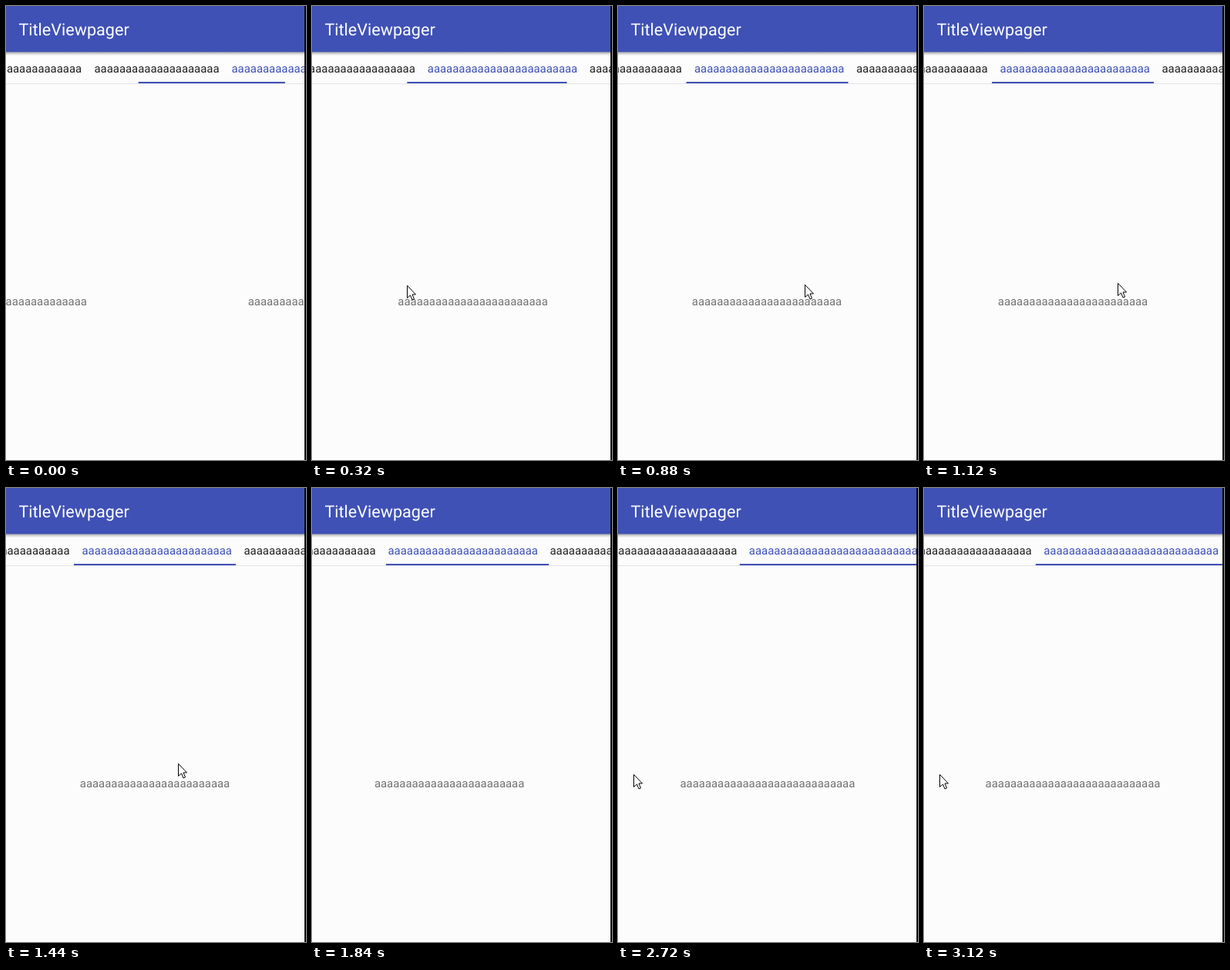
Animation of 389 by 587 pixels, one loop 3280 ms. Source, as an HTML page with a canvas:

```html
<!DOCTYPE html>
<html lang="en">
<head>
<meta charset="utf-8">
<title>TitleViewpager</title>
<style>
  html, body { margin: 0; width: 100%; height: 100%; overflow: hidden; }
  canvas { display: block; }
</style>
</head>
<body>
<canvas id="stage" width="389" height="587"></canvas>
<script>
const ctx = document.getElementById('stage').getContext('2d');
const LOOP = 3280, STEP = 80, PAGE = 387;
const PRESS = 1520, SELECT = 2080, RETURN = 2640;
const BLUE = '#3f51b5', FONT_SIZE = 14.9;

const stalls = [1040, 1200, 2000, 2240, 2400, 2480, 3040, 3200];
const ticks = Array.from({ length: LOOP / STEP }, (_, i) => i * STEP)
  .filter(t => !stalls.includes(t));

// Each tab is four letters longer than the one before; x counts from tab 1.
const tabs = [];
for (let i = 0, x = -146; i < 4; i++) {
  const n = 16 + 4 * i, w = 8 * n + 18;
  tabs.push({ label: 'a'.repeat(n), x, w });
  x += w;
}

const lerp = (a, b, u) => a + (b - a) * u;
const easeOut = (u, power) => 1 - (1 - Math.min(Math.max(u, 0), 1)) ** power;

// Pager position in pages: a settling page, then a short drag and a fling.
function position(t) {
  if (t < 0) return 1.38;
  if (t < PRESS) return lerp(1.437, 2, easeOut(t / 780, 5));
  const drag = 2 + .0385 * easeOut((t - PRESS) / 320, 3);
  return lerp(drag, 3, easeOut((t - 2000) / 1028, 5));
}

// Left edge of the text of tab 1; the strip scrolls after each selection.
function stripLeft(t) {
  const scroll = start => easeOut((t - start) / 1131, 4);
  return 115 - 194 * scroll(0) - 153.5 * scroll(2220);
}

function rect(x, y, w, h, color) {
  ctx.fillStyle = color;
  ctx.fillRect(x, y, w, h);
}

function text(str, x, y, size, color) {
  ctx.font = size + 'px Roboto, sans-serif';
  ctx.fillStyle = color;
  ctx.fillText(str, x, y);
}

const arrow = new Path2D('M.5 .5v16l4-3.5 2.5 6 2.5-1-2.5-6h4.5z');

function drawCursor(x, y) {
  ctx.save();
  ctx.translate(Math.round(x), Math.round(y));
  ctx.fillStyle = '#fff';
  ctx.fill(arrow);
  ctx.strokeStyle = '#000';
  ctx.stroke(arrow);
  ctx.restore();
}

function drawHeader() {
  const shadow = ctx.createLinearGradient(0, 59, 0, 64);
  shadow.addColorStop(0, 'rgba(0,0,0,.35)');
  shadow.addColorStop(1, 'rgba(0,0,0,0)');
  rect(0, 59, PAGE, 5, shadow);
  rect(0, 0, PAGE, 59.5, BLUE);
  text('TitleViewpager', 16.4, 38, 21.6, '#fff');
}

function draw(t, before) {
  rect(0, 0, 389, 587, '#fcfcfc');
  drawHeader();

  const left = stripLeft(t), pos = position(t);
  const selected = t < SELECT ? 2 : 3;
  tabs.forEach(({ label, x }, i) => {
    text(label, left + x - .5, 86, FONT_SIZE, i === selected ? BLUE : '#212121');
    const width = ctx.measureText(label).width;
    text(label, (i - pos) * PAGE + 193 - width / 2, 387, FONT_SIZE, '#737373');
  });

  // The indicator trails the pages by one picture.
  const trail = position(before), i = Math.min(Math.floor(trail), 2);
  const a = tabs[i], b = tabs[i + 1], u = trail - i;
  rect(0, 100, PAGE, 1, '#e4e4e6');
  rect(left - 11 + lerp(a.x, b.x, u), 98, lerp(a.w, b.w, u), 2, BLUE);

  // The pointer arcs right and back, and is hidden while pressed.
  const s = (t - 320) / 560;
  if (t >= 160 && t <= PRESS) drawCursor(123 + 119 * s - 69 * s * (s - 1), 361 - 1.25 * s * s);
  if (t >= RETURN) drawCursor(20, 370);
  rect(PAGE, 0, 2, 587, '#000');
}

ctx.textRendering = 'geometricPrecision';
const start = performance.now();
function frame() {
  const now = Math.max(0, performance.now() - start) % LOOP;
  const k = ticks.filter(t => t <= now).length - 1;
  draw(ticks[k], k ? ticks[k - 1] : -STEP);
  requestAnimationFrame(frame);
}
frame();
</script>
</body>
</html>
```
